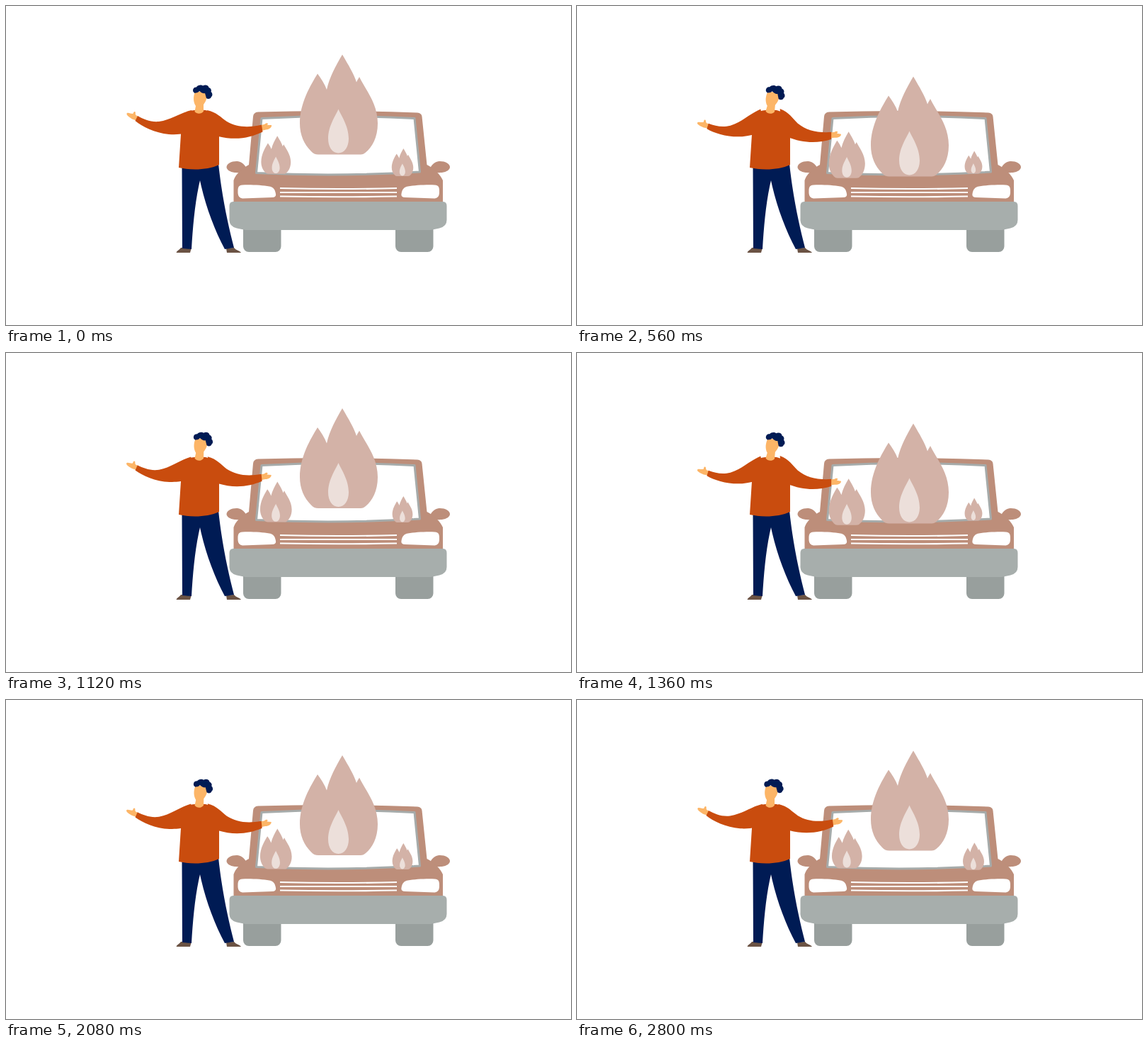
An HTML page that plays this animation: 798 px wide and 450 px high, repeating every 2880 ms.

```html
<!DOCTYPE html>
<html lang="en">
<head>
<meta charset="utf-8">
<title>Car fire</title>
<style>
  html, body { margin: 0; width: 100%; height: 100%; overflow: hidden; background: #fff; }
  svg { display: block; width: 100vw; height: 100vh; }
  .body { fill: #bd8e7a; }
  .shirt { fill: #c94c0e; }
  .skin { fill: #fcb567; }
  .navy { fill: #001b54; }
  .shoe { fill: #6b5344; }
  .wheel { fill: #989f9d; }
  .bumper { fill: #a7aeac; }
  .glass { fill: #fff; stroke: #a6abaa; stroke-width: 3; stroke-linejoin: round; }
  .grille { fill: none; stroke: #fff; stroke-width: 2.2; }
</style>
</head>
<body>
<svg viewBox="0 0 798 450">
  <defs>
    <!-- flame centred on its own origin -->
    <g id="flame">
      <path fill="#d3b2a7" d="M5-70.5C14-55 21-44 25-31.5C26-34 28-37 29-39C37-22 55-2 55 26.5C55 48 46 62 36 69Q34 70.5 28 70.5H-29Q-35 70.5-39 66C-49 56-55 43-55 26.5C-55-2-40-27-30-43.500C-25-37-20-29-17-21C-13-39-4-55 5-70.500Z"/>
      <path fill="#ecdfda" d="M-.5 6.500C3 15 14 30 14 48C14 60 8 68.500-.5 68.500S-15 60-15 48C-15 30-4 15-.5 6.500Z"/>
    </g>
    <g id="side">
      <rect class="wheel" x="335" y="306" width="53.500" height="41" rx="8"/>
      <path class="body" d="M311.500 227C312 222 319 218.500 327 219C333 219.500 339 225 340 231C336 235 330 235.500 323 235C316 234 311.500 231 311.500 227Z"/>
    </g>
    <path id="lamp" fill="#fff" d="M334 252.500C348 252 362 253 372 254.500C378 255.500 380 259 381 265Q382 269.500 376 270L334 271.500Q328 271 327.500 264V259Q327.500 253 334 252.500Z"/>
  </defs>

  <use href="#side"/>
  <use href="#side" transform="matrix(-1 0 0 1 938.500 0)"/>
  <path class="body" d="M349 156Q349.500 150 356 149.500Q468 146 581 150.500Q587 151 587.500 156L594.500 224C603 228 614 238 617 246V280H321.500V246C324 237 335 228 343 224Z"/>
  <path class="glass" d="M361 158.500Q468 152.500 577 158.500L584.500 234Q468 241 353.500 235.500Z"/>
  <use href="#lamp"/>
  <use href="#lamp" transform="matrix(-1 0 0 1 939.500 0)"/>
  <path class="grille" d="M387 257Q469 259 552 257M387 263H552M387 268.500Q469 270 552 268.500"/>
  <path class="bumper" d="M321 276H617Q622.500 276 622.500 282V302Q622.500 311 612 313.500L600 316H338L326 313.500Q315.500 311 315.500 302V282Q315.500 276 321 276Z"/>

  <use id="big" href="#flame"/>
  <use id="left" href="#flame"/>
  <use id="right" href="#flame"/>

  <path class="shoe" d="M247 341H262L260 348H240.500C241.500 345 245 344 247 341ZM311 342L322 341C325 345 331 345.500 332 348H312Z"/>
  <path class="navy" d="M248.500 226L249 342L262 343C264 310 267 275 274 246C281 280 294 315 309 343L322 341C314 310 305 270 300 222Z"/>
  <g id="armL">
    <path class="skin" d="M187 156L183.500 154C182 152 184 149 181.500 149C180 149 180 152 179 152C176 152 173 150 171 151C169 153 173 156 176 158C178 160 181 160 184 162Z"/>
    <path class="shirt" d="M262 147C245 151 235 160 216 163C204 164 195 160 186 155L182.500 162C192 170 210 179 230 181C240 181.500 246 181 250 180L262 165Z"/>
  </g>
  <g id="armR">
    <path class="skin" d="M360 168L365 167C367 165 369 164.500 370 166L369 168L375 168C376 171 371 174.500 367 174.500L361 176Z"/>
    <path class="shirt" d="M284 147C298 150 303 157 312 163C326 171 342 172 361 167.500L362.500 177.500C345 186 325 190 300 184L290 170Z"/>
  </g>
  <path class="shirt" d="M262 147.500Q272 146 282 147C291 149 297 154 301 160V224C285 231.500 262 232 244 228L247 181V157C251 152 256 149 262 147.500Z"/>
  <g id="head">
    <path class="skin" d="M267 121C264 128 264.500 136 268 141L266.500 149C270 153 276 152.500 279 148.500L279 139C283 134 285 128 283 121Z"/>
    <path class="navy" d="M264.500 121C263 117 266 114 269 114.500C271 111 276 111 278 112.500C282 110.500 286 112 286.500 115C289.500 116 290.500 119 289.500 121C292 123 292 127 290 128C289.500 131 285 132 283 130L281 123C277 124 275 121 273 120C271 123 268 122 266.500 123Z"/>
  </g>
</svg>
<script>
  const LOOP = 2880, CYCLE = 960, STEP = 80;
  const set = (id, transform) =>
    document.getElementById(id).setAttribute('transform', transform);
  const flame = (id, x, y, scale) => set(id, `translate(${x} ${y}) scale(${scale})`);
  const turn = (id, angle, x, y) => set(id, `rotate(${angle} ${x} ${y})`);

  // 0 = flame high and arms raised, 1 = flame low and arms dropped
  const sway = t => Math.pow((1 - Math.cos(2 * Math.PI * t / CYCLE)) / 2, 0.9);

  function draw(time) {
    const p = sway(Math.floor((time % LOOP + 0.5) / STEP) * STEP);
    flame('big', 470, 139 + 33 * p, 1);
    flame('left', 381.3, 210, 0.38 + 0.09 * p);
    flame('right', 560, 220.5, 0.277 - 0.054 * p);
    turn('armL', -10 * p, 251, 162);
    turn('armR', 10 * p, 297, 162);
    turn('head', 5.5 * p, 272, 149);
  }

  const start = performance.now();
  function tick() {
    draw(performance.now() - start);
    requestAnimationFrame(tick);
  }
  tick();
</script>
</body>
</html>
```
